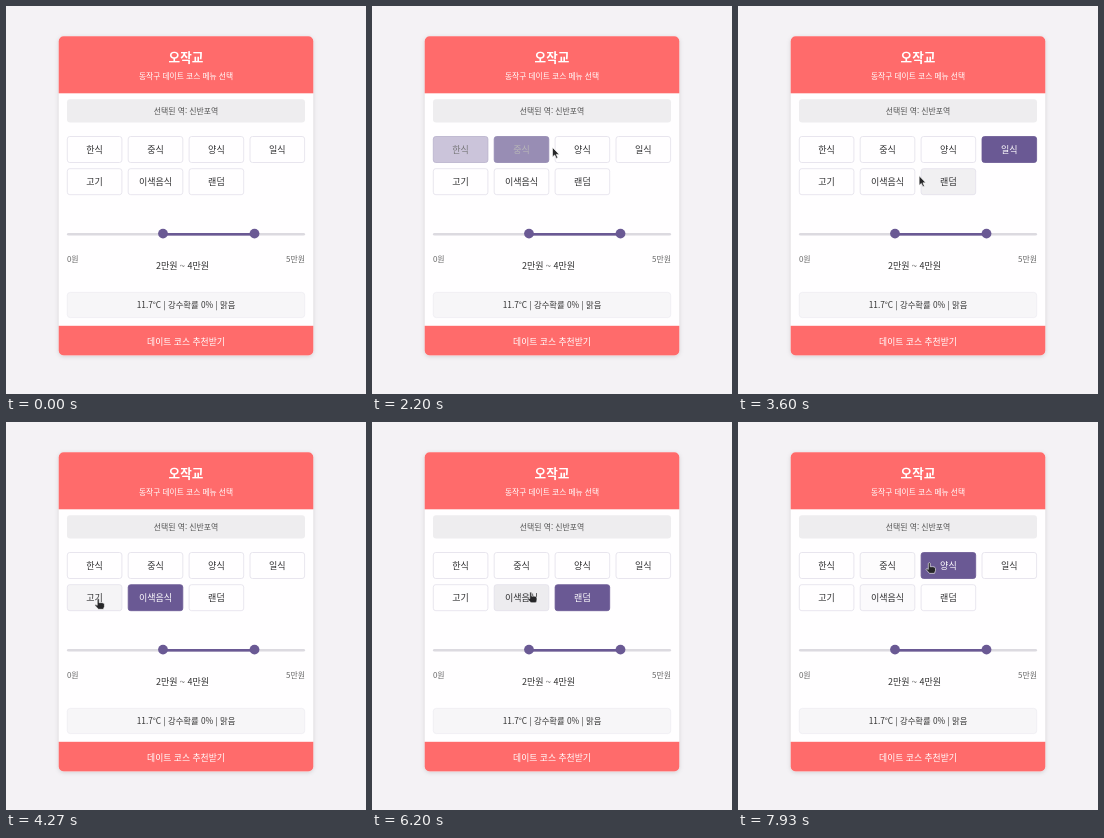
An HTML page that plays this animation: 360 by 388 pixels, repeating every 8000 ms.

```html
<!DOCTYPE html>
<html lang="ko">
<head>
<meta charset="utf-8">
<style>
html, body { margin: 0; width: 100%; height: 100%; overflow: hidden; background: #f4f2f5; }
svg { display: block; width: 360px; height: 388px; }
text { font-family: "Noto Sans CJK KR", "Noto Sans CJK", "Noto Sans", sans-serif; text-anchor: middle; }
.card { filter: drop-shadow(0 1px 2px #0002); }
</style>
</head>
<body>
<svg id="stage" viewBox="0 0 360 388"></svg>
<script>
const LOOP = 8000, STEP = 200 / 3, FADE = 200;
const CORAL = '#ff6b6b', PURPLE = [106, 89, 148], INK = [48, 48, 50];
const WHITE = [255, 254, 255], HOVER = [236, 235, 238], EDGE = [226, 224, 234];
const MENU = ['한식', '중식', '양식', '일식', '고기', '이색음식', '랜덤'];
const BOX_W = 54.6, BOX_H = 26;
const boxes = MENU.map((_, i) => ({ x: 61.3 + (i % 4) * 60.9, y: i < 4 ? 130.5 : 162.7 }));

// Pointer stops; it clicks at each one unless told not to
const stops = [
  { t: 70, x: 28, y: 350 },
  { t: 1180, x: 88, y: 143 },
  { t: 1730, x: 90, y: 143 },
  { t: 2075, x: 158, y: 140 },
  { t: 2750, x: 207, y: 143 },
  { t: 3240, x: 262, y: 149 },
  { t: 4040, x: 165, y: 174 },
  { t: 4540, x: 78, y: 177 },
  { t: 5300, x: 213, y: 187 },
  { t: 5850, x: 213, y: 180 },
  { t: 6400, x: 156, y: 169.5 },
  { t: 7200, x: 207, y: 145 },
  { t: 7750, x: 155, y: 170, idle: true },
  { t: 8000, x: 192, y: 140 },
];

const label = (text, x, y, size, fill, extra = '') =>
  `<text x="${x}" y="${y}" font-size="${size}" fill="${fill}" ${extra}>${text}</text>`;
const rect = (x, y, w, h, fill, extra = '') =>
  `<rect x="${x}" y="${y}" width="${w}" height="${h}" fill="${fill}" ${extra}/>`;
const thumb = x => `<circle cx="${x}" cy="227.6" r="4.9" fill="#6a5994"/>`;

const stage = document.getElementById('stage');
stage.innerHTML = `
  <clipPath id="round">${rect(52.7, 30.3, 254.6, 319.2, '#fff', 'rx="5"')}</clipPath>
  ${rect(52.7, 30.3, 254.6, 319.2, '#fffeff', 'rx="5" class="card"')}
  <g clip-path="url(#round)">
    ${rect(52, 30, 256, 57.3, CORAL)}
    ${rect(52, 319.8, 256, 30, CORAL)}
  </g>
  ${label('오작교', 180, 55.9, 12.6, '#fff', 'font-weight="700"')}
  ${label('동작구 데이트 코스 메뉴 선택', 180, 73, 7.75, '#fff')}
  ${rect(61, 93.3, 238, 23.2, '#eeedef', 'rx="3"')}
  ${label('선택된 역: 신반포역', 180, 108, 7.9, '#555')}
  ${boxes.map(({ x, y }, i) => `<g class="menu">
    ${rect(x, y, BOX_W, BOX_H, '#fff', 'rx="2.5" stroke-width=".8"')}
    ${label(MENU[i], x + BOX_W / 2, y + 16.4, 9, '#333')}</g>`).join('')}
  ${rect(61, 227, 238, 2.6, '#dcdae0', 'rx="1.3"')}
  ${rect(157, 227, 91.5, 2.6, '#6a5994')}
  ${thumb(157)}${thumb(248.5)}
  ${label('0원', 66.8, 256, 7.9, '#666')}
  ${label('5만원', 289.5, 256, 7.9, '#666')}
  ${label('2만원 ~ 4만원', 176.5, 262.7, 9, '#333')}
  ${rect(61.3, 286.4, 237.4, 25.2, '#f7f6f8', 'rx="3" stroke="#eeedf1" stroke-width=".8"')}
  ${label('11.7°C | 강수확률 0% | 맑음', 180, 302.2, 8.3, '#333')}
  ${label('데이트 코스 추천받기', 180, 338.6, 8.8, '#fff')}
  <path id="pointer" fill="#262628" stroke="#fff" stroke-width=".6" stroke-linejoin="round"/>`;

const items = [...stage.querySelectorAll('.menu')].map(g => g.children);
const pointer = document.getElementById('pointer');
const ARROW = 'M0 0V9.5L2.2 7.6 3.8 11 5.3 10.3 3.8 7H6.7Z';
const HAND = 'M-1 .8Q0 -.6 1 .8V4.2Q6 3.6 6.2 6V8L5.2 10.8H.2L-3.4 6.8Q-2.6 5.4 -1 6.8Z';

const clamp = v => Math.max(0, Math.min(1, v));
const easeOut = v => 1 - (1 - v) ** 3;
const lerp = (a, b, v) => a + (b - a) * v;
const mix = (a, b, v) => a.map((c, i) => lerp(c, b[i], v));
const rgb = c => `rgb(${c.map(Math.round)})`;

const buttonAt = ({ x, y }) => boxes.findIndex(b =>
  x >= b.x && x <= b.x + BOX_W && y >= b.y && y <= b.y + BOX_H);

function pointerAt(t) {
  const k = Math.max(1, stops.findIndex(s => s.t > t));
  const a = stops[k - 1], b = stops[k];
  const v = easeOut(clamp((t - a.t) / (b.t - a.t)));
  return { x: lerp(a.x, b.x, v), y: lerp(a.y, b.y, v) };
}

const clicks = stops.filter(s => !s.idle).map(s => ({ t: s.t, button: buttonAt(s) }));
const selectedAt = t => clicks.findLast(c => c.t <= t)?.button ?? -1;
const hoveredAt = t => buttonAt(pointerAt(t));

// A linear fade: the share of the last FADE ms in which button i was active
function level(activeAt, i, t, samples = 20) {
  let active = 0;
  for (let k = 0; k < samples; k++) {
    if (activeAt(t - FADE * (k + .5) / samples) === i) active++;
  }
  return active / samples;
}

function draw(t) {
  items.forEach(([box, text], i) => {
    const on = level(selectedAt, i, t);
    const base = mix(WHITE, HOVER, level(hoveredAt, i, t));
    box.setAttribute('fill', rgb(mix(base, PURPLE, on)));
    box.setAttribute('stroke', rgb(mix(EDGE, PURPLE, on)));
    text.setAttribute('fill', rgb(mix(INK, WHITE, on)));
  });
  const tip = pointerAt(t);
  pointer.setAttribute('d', buttonAt(tip) < 0 ? ARROW : HAND);
  pointer.setAttribute('transform', `translate(${tip.x} ${tip.y})`);
  pointer.setAttribute('visibility', t < STEP ? 'hidden' : 'visible');
}

const start = performance.now();
function tick(now) {
  const t = Math.max(0, now - start) % LOOP;
  draw(Math.floor((t + 5) / STEP) * STEP % LOOP);
  requestAnimationFrame(tick);
}
draw(0);
requestAnimationFrame(tick);
</script>
</body>
</html>
```
